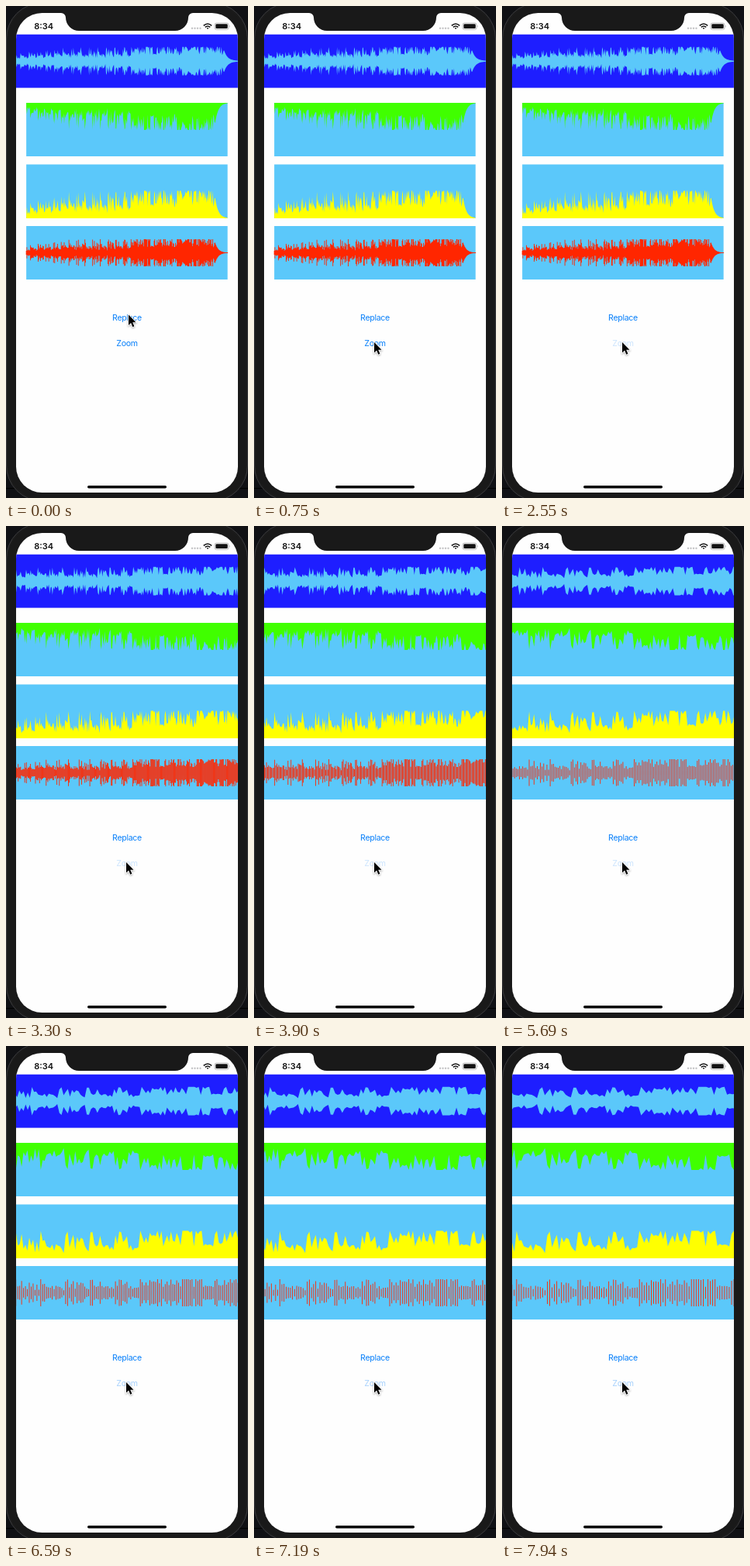
Write an HTML page that moves like this. It is 312x635 px and loops after 8000 ms.

```html
<!DOCTYPE html>
<html lang="en">
<head>
<meta charset="utf-8">
<title>Waveform zoom</title>
<style>
  html, body { margin: 0; width: 100%; height: 100%; overflow: hidden; background: #101114; }
  svg { display: block; width: 312px; height: 635px; }
  text { font-family: Inter, Roboto, sans-serif; }
  .button { font-size: 10.6px; letter-spacing: -.3px; text-anchor: middle; fill: #0a80fa; }
</style>
</head>
<body>
<svg viewBox="0 0 312 635">
  <defs>
    <clipPath id="screen"><rect x="13" y="9" width="286" height="619" rx="33.5"/></clipPath>
  </defs>
  <path d="M0 622.5H312" stroke="#000"/>
  <rect x=".5" y="-4" width="311" height="643" rx="46" fill="#1b1b1b" stroke="#3b3b3d"/>
  <rect x="3" y="-1" width="306" height="637" rx="43" fill="#191919"/>

  <g clip-path="url(#screen)">
    <rect x="13" y="9" width="286" height="619" fill="#fefefe"/>
    <g id="waves"></g>
    <path d="M71 8V9A6 6 0 0 1 77 15A17 17 0 0 0 94 32H218A17 17 0 0 0 235 15A6 6 0 0 1 241 9V8Z" fill="#191919"/>
  </g>

  <text x="36.3" y="30.2" font-size="11" font-weight="600" fill="#111">8:34</text>
  <g fill="#c4c4c6">
    <circle cx="240" cy="28.8" r="1.2"/><circle cx="243.5" cy="28.8" r="1.2"/>
    <circle cx="247" cy="28.8" r="1.2"/><circle cx="250.5" cy="28.8" r="1.2"/>
  </g>
  <g fill="none" stroke="#111" stroke-width="1.6">
    <path d="M254.8 25.3Q260 20.7 265.2 25.3M256.8 27.4Q260 24.6 263.2 27.4"/>
    <path d="M258.6 28.4L260 30L261.4 28.4Q260 27.4 258.6 28.4Z" fill="#111" stroke="none"/>
  </g>
  <rect x="269" y="22" width="18" height="8.4" rx="2.4" fill="none" stroke="#aaa" stroke-width=".8"/>
  <rect x="270.3" y="23.3" width="15.4" height="5.8" rx="1.3" fill="#111"/>
  <path d="M288.2 24.8Q289.6 26.2 288.2 27.6Z" fill="#aaa"/>

  <text class="button" x="156" y="405.5">Replace</text>
  <text class="button" id="zoom" x="156" y="438.8">Zoom</text>
  <rect x="105" y="619" width="102" height="3.5" rx="1.75" fill="#000"/>

  <path id="cursor" d="M0 0V13.4L3.1 10.6L5.3 15.7L7.4 14.8L5.2 9.8H9.5Z"
        fill="#000" stroke="#fff" stroke-width="1.6" paint-order="stroke"
        style="filter: drop-shadow(0 1px 1px #0005)"/>
</svg>

<script>
const LOOP = 8000, STEP = 150, SAMPLES = 340;
const ONSET = .52, BEAT = .0386, TAIL = .938;
const SKY = '#5bc8fa';
const byId = id => document.getElementById(id);

let seed = 7;
const random = () => (seed = seed * 16807 % 2147483647) / 2147483647;

// Loudness: decaying beats that grow, then a clipped loud part, then a fade.
function loudness(u) {
  const r = random();
  if (u > TAIL) return .75 * Math.exp((TAIL - u) / .016);
  if (u > ONSET) return Math.min(1, .42 + .76 * r);
  const beat = (ONSET - u) / BEAT;
  const phase = 1 - beat % 1;
  const grow = Math.min(1, .55 + 2 * u);
  if (phase < .08) return grow * (.8 + .2 * r);
  const body = (.68 - .36 * phase) * (.55 + .8 * r);
  return grow * (body + (r > .88 ? .15 : 0));
}
const samples = Array.from({ length: SAMPLES + 1 }, (_, i) => loudness(i / SAMPLES));

// Outlines: x maps a sample index to the stage, y is the base line, h the full height.
const edge = (x, y, h) => samples.map((a, i) => `${x(i).toFixed(2)} ${(y + a * h).toFixed(2)}`);

const hanging = (x, y, h) =>
  `M${x(0)} ${y}L${edge(x, y, h).join('L')}L${x(SAMPLES)} ${y}Z`;

const mirrored = (x, y, h) =>
  `M${edge(x, y - .4, -h).join('L')}L${edge(x, y + .4, h).reverse().join('L')}Z`;

const striped = (x, y, h) => samples.map((a, i) => {
  const half = Math.max(.4, a * h);
  return `M${(x(i) - .45).toFixed(2)} ${(y - half).toFixed(2)}h.9v${(2 * half).toFixed(2)}h-.9Z`;
}).join('');

const panels = [
  { top: 36.7, bottom: 105.6, width: 286, back: '#1e1eff', fill: SKY, draw: mirrored, base: 71.2, height: 18 },
  { top: 125, bottom: 194, width: 259.5, back: SKY, fill: '#40ff00', draw: hanging, base: 125, height: 35 },
  { top: 204.5, bottom: 274, width: 259.5, back: SKY, fill: '#ffff00', draw: hanging, base: 274, height: -35.5 },
  { top: 284, bottom: 353, width: 259.5, back: SKY, fill: '#ff2600', draw: striped, base: 318.5, height: 17.5 }
];

function addShape(name, attrs) {
  const node = document.createElementNS('http://www.w3.org/2000/svg', name);
  for (const key in attrs) node.setAttribute(key, attrs[key]);
  return byId('waves').appendChild(node);
}
for (const p of panels) {
  p.rect = addShape('rect', { y: p.top, height: p.bottom - p.top, fill: p.back });
  p.path = addShape('path', { fill: p.fill });
}

// The screen refreshes in steps, with two longer pauses.
function stepTime(t) {
  if (t < 3900) return Math.floor(t / STEP) * STEP;
  if (t < 4190) return 3900;
  if (t >= 5990 && t < 6290) return 5990;
  return 4190 + Math.floor((t - 4190) / STEP) * STEP;
}

function setZoom(zoom) {
  for (const p of panels) {
    const width = p.width * zoom, left = 155.9 - width / 2;
    p.rect.setAttribute('x', left);
    p.rect.setAttribute('width', width);
    p.path.setAttribute('d', p.draw(i => left + i / SAMPLES * width, p.base, p.height));
  }
}

let shown = -1;
function frame() {
  const t = stepTime(performance.now() % LOOP);
  if (t !== shown) {
    shown = t;
    setZoom(1 + Math.max(0, t - 2600) * .00056);
    const move = Math.min(1, Math.max(0, (t - 300) / 450));
    byId('cursor').setAttribute('transform', `translate(${158 - 3 * move} ${398.5 + 35.5 * move})`);
    byId('zoom').setAttribute('opacity', t < 2550 ? 1 : t < 6290 ? .2 : .35);
  }
  requestAnimationFrame(frame);
}
frame();
</script>
</body>
</html>
```
